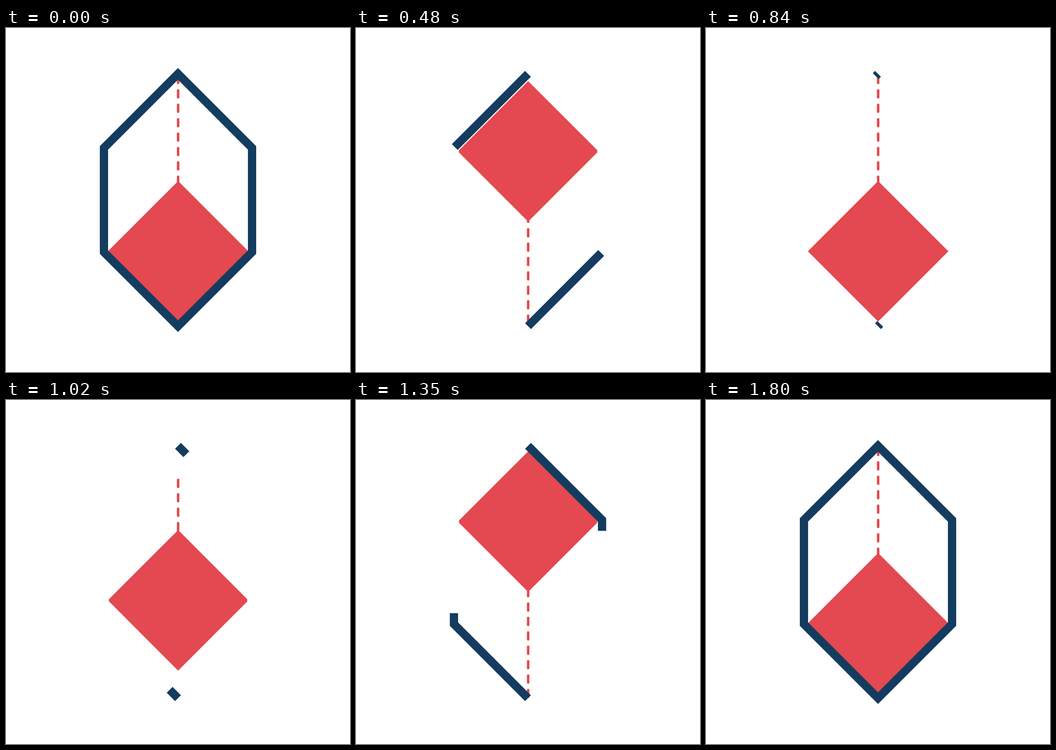
Animation, 748 px wide and 748 px high, one loop 1830 ms. Source, as an HTML page:

```html
<!DOCTYPE html>
<html lang="en">
<head>
<meta charset="utf-8">
<title>Hexagon loader</title>
<style>
  html, body { margin: 0; width: 100%; height: 100%; overflow: hidden; background: #fff; }
  svg { display: block; width: 100vw; height: 100vh; }
  .frame { fill: none; stroke: #143c5f; stroke-width: 18; stroke-miterlimit: 10; }
  .red { fill: #e44850; }
</style>
</head>
<body>
<svg viewBox="0 0 748 748">
  <defs>
    <clipPath id="sides"><rect x="223.7" y="0" width="300.9" height="748"/></clipPath>
    <path id="half" pathLength="1" d="M374 99.7L213 260.7V487.3L374 648.3"/>
  </defs>
  <g id="line" class="red"></g>
  <g id="clip">
    <path id="gem" class="red" d="M374.3 332.7L527.1 485.5L374.3 638.3L221.5 485.5Z"/>
  </g>
  <g id="halves" class="frame">
    <use href="#half"/>
    <use href="#half" transform="rotate(180 374 374)"/>
  </g>
  <path id="hexagon" class="frame" d="M374 99.7L213 260.7V487.3L374 648.3L535 487.3V260.7Z"/>
</svg>
<script>
  const STEP = 30, STEPS = 61, MID = 30;
  const RISE = 221, LINE_DROP = 307;
  const DASH = 20, PERIOD = 31.3, DASHES = 8, LINE_TOP = 102;
  const $ = id => document.getElementById(id);
  const line = $('line'), clip = $('clip'), gem = $('gem');
  const half = $('half'), halves = $('halves'), hexagon = $('hexagon');

  for (let i = 0; i < DASHES; i++) {
    const dash = document.createElementNS('http://www.w3.org/2000/svg', 'rect');
    const box = { x: 371.6, y: LINE_TOP + i * PERIOD, width: 5.4, height: DASH, rx: 2 };
    for (const key in box) dash.setAttribute(key, box[key]);
    line.append(dash);
  }

  const cubic = (a, b, s) => 3 * a * s * (1 - s) ** 2 + 3 * b * s * s * (1 - s) + s ** 3;

  // Nearly linear start, soft finish
  function easeOut(x) {
    if (x <= 0 || x >= 1) return x <= 0 ? 0 : 1;
    let lo = 0, hi = 1;
    for (let i = 0; i < 30; i++) {
      const s = (lo + hi) / 2;
      if (cubic(0.167, 0.667, s) < x) lo = s; else hi = s;
    }
    return cubic(0.15, 1, lo);
  }

  function smooth(from, to, n) {
    const u = Math.min(1, Math.max(0, (n - from) / (to - from)));
    return u * u * (3 - 2 * u);
  }

  // Two bounces; the last descent is slower
  const lift = n => smooth(0, 13, n) - smooth(15, 28, n)
                  + smooth(30, 43, n) - smooth(45, 60, n);

  function draw(n) {
    const p = lift(n);
    gem.setAttribute('transform', `translate(0 ${-RISE * p})`);
    line.setAttribute('transform', `translate(0 ${LINE_DROP * p})`);
    if (p > 0.0001) clip.setAttribute('clip-path', 'url(#sides)');
    else clip.removeAttribute('clip-path');

    const shown = 1 - easeOut(Math.min(n, 2 * MID - n) / MID);
    const full = shown === 1;
    half.setAttribute('stroke-dasharray', `${shown} 2`);
    halves.setAttribute('transform', n > MID ? 'matrix(-1 0 0 1 748 0)' : '');
    halves.style.display = full || shown === 0 ? 'none' : '';
    hexagon.style.display = full ? '' : 'none';
  }

  const start = performance.now();
  function tick() {
    draw(Math.floor((performance.now() - start + 1) / STEP) % STEPS);
    requestAnimationFrame(tick);
  }
  tick();
</script>
</body>
</html>
```
